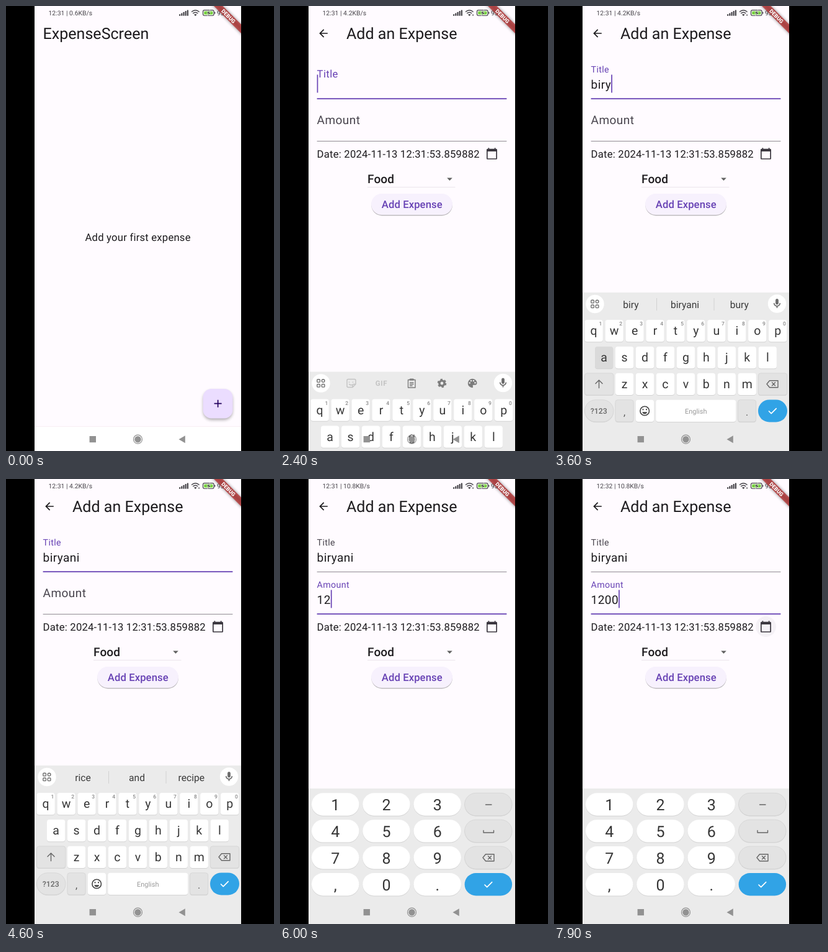
These frames come from a looping animation (432 by 716 pixels, 8000 ms). An HTML page:

```html
<!DOCTYPE html>
<html lang="en">
<head>
<meta charset="utf-8">
<title>Expense form</title>
<style>
html, body { margin: 0; width: 100%; height: 100%; overflow: hidden; background: #000; }
svg { display: block; width: 100vw; height: 100vh; }
text { font-family: Roboto, sans-serif; text-rendering: geometricPrecision; white-space: pre; }
.title { font-size: 25.06px; fill: #1d1b1e; }
.body { font-size: 16.66px; letter-spacing: .2125px; fill: #1d1b1e; }
.input { font-size: 19.04px; letter-spacing: .425px; fill: #1d1b1e; }
.status { font-size: 10.4px; fill: #47454a; }
.key { font-size: 19.5px; fill: #363636; text-anchor: middle; }
.hint { font-size: 8.5px; font-weight: 500; fill: #8a8a8a; text-anchor: middle; }
.word { font-size: 15.6px; fill: #3a3a3a; text-anchor: middle; }
.digit { font-size: 25px; fill: #363636; text-anchor: middle; }
.line { fill: none; stroke-width: 1.4; stroke-linecap: round; stroke-linejoin: round; }
</style>
</head>
<body>
<svg id="stage" viewBox="0 0 432 716">
  <defs>
    <clipPath id="phone"><rect x="46" y="0" width="333" height="716"/></clipPath>
    <filter id="soft" x="-30%" y="-30%" width="160%" height="180%"><feGaussianBlur stdDeviation="2.4"/></filter>
    <filter id="faint" x="-10%" y="-20%" width="120%" height="150%"><feGaussianBlur stdDeviation=".7"/></filter>
  </defs>
  <rect width="432" height="716" fill="#000"/>
  <g clip-path="url(#phone)">
    <rect x="46" width="333" height="716" fill="#fffbff"/>

    <g id="home">
      <text class="title" x="59.6" y="53">ExpenseScreen</text>
      <text class="body" x="212.6" y="378" text-anchor="middle">Add your first expense</text>
      <rect x="318" y="619" width="47" height="47" rx="13.6" fill="#000" opacity=".32" filter="url(#soft)"/>
      <rect x="317.6" y="615.9" width="47.8" height="47.6" rx="13.6" fill="#ebddff"/>
      <path d="M335.6 639.7h12M341.6 633.7v12" stroke="#22005d" stroke-width="1.7"/>
    </g>

    <g id="form">
      <path transform="translate(59.8 33.8) scale(.85)" fill="#1d1b1e" d="M20 11H7.83l5.59-5.59L12 4l-8 8 8 8 1.41-1.41L7.83 13H20z"/>
      <text class="title" x="107" y="53">Add an Expense</text>
      <g id="fields"></g>
      <rect id="cursor" width="1.7" height="29" fill="#6742b4"/>
      <text class="body" x="59.6" y="243.5">Date: 2024-11-13 12:31:53.859882</text>
      <circle id="ripple" cx="341.5" cy="237.5" r="16.5" fill="#49454e" opacity=".05"/>
      <path transform="translate(331.3 227.3) scale(.85)" fill="#3c3840" d="M20 3h-1V1h-2v2H7V1H5v2H4c-1.1 0-2 .9-2 2v16c0 1.1.9 2 2 2h16c1.1 0 2-.9 2-2V5c0-1.1-.9-2-2-2zm0 18H4V8h16z"/>
      <text x="141" y="284.5" font-size="19.04" font-weight="500" letter-spacing=".1275" fill="#1d1b1e">Food</text>
      <path d="M269.2 276.6h8.6l-4.3 4.3z" fill="#616161"/>
      <path d="M141 291.5h141.5" stroke="#ebe6ec"/>
      <rect x="147.3" y="303.4" width="130.6" height="34" rx="17" fill="#000" opacity=".25" filter="url(#faint)"/>
      <rect x="147" y="302" width="131" height="34" rx="17" fill="#f7f1fd"/>
      <text x="163.8" y="325" font-size="16.66" font-weight="500" letter-spacing=".085" fill="#6742b4">Add Expense</text>
    </g>

    <rect x="46" y="677" width="333" height="39" fill="#fff"/>
    <path d="M46 676.5h333" stroke="#f8eff4"/>

    <g id="letters">
      <rect x="46" y="461" width="333" height="256" fill="#ebebeb"/>
      <g id="tools" stroke="#7c7c7c" class="line">
        <g stroke="#c3c3c3">
          <path d="M110 473h10q2 0 2 2v6l-5 5h-7q-2 0-2-2v-9q0-2 2-2zM122 481h-3q-2 0-2 2v3"/>
          <path d="M111.500 477.500v.5M117.500 477.500v.5M111.500 481q2 2 4.500 1"/>
        </g>
        <text x="163.400" y="483.300" font-size="11.500" font-weight="700" text-anchor="middle" fill="#c3c3c3" stroke="none" letter-spacing=".6">GIF</text>
        <path d="M206.500 474h11.500v12.500h-11.500zM209.500 478.500h5.500M209.500 481h5.500M209.500 483.500h3.500"/>
        <path d="M210 473.500h4.500" stroke-width="3"/>
        <circle cx="261" cy="479.500" r="4.100" stroke-width="3.400"/>
        <circle cx="261" cy="479.500" r="6.200" stroke-width="2.200" stroke-dasharray="3.3 3.193" stroke-linecap="butt"/>
        <path d="M310 472.300a7.200 7.200 0 1 0 0 14.400q1.700-.5 1-2.200-1-2 1-2.300h2.500q3-.3 3-3.500a7.200 7.200 0 0 0-7.500-6.400z" fill="#7c7c7c" stroke="none"/>
        <g fill="#ebebeb" stroke="none">
          <circle cx="305.700" cy="479" r="1.300"/><circle cx="308" cy="475.500" r="1.300"/>
          <circle cx="312" cy="475.500" r="1.300"/><circle cx="314.500" cy="478.800" r="1.300"/>
        </g>
      </g>
      <g id="words"><path d="M165.500 470v20M258 470v20" stroke="#d2d2d2"/></g>
      <circle cx="66" cy="479.500" r="14.700" fill="#fff"/>
      <circle cx="359.500" cy="479" r="14.700" fill="#fff"/>
      <g class="line" stroke="#707070">
        <rect x="59.800" y="473.300" width="4.600" height="4.600" rx="1.200"/><rect x="67.300" y="473.300" width="4.600" height="4.600" rx="2.300"/>
        <rect x="59.800" y="481" width="4.600" height="4.600" rx="1.200"/><rect x="67.300" y="481" width="4.600" height="4.600" rx="1.200"/>
      </g>
      <path transform="translate(349.900 469.300) scale(.8)" fill="#6c6c6c" d="M12 14c1.660 0 3-1.340 3-3V5c0-1.660-1.340-3-3-3S9 3.340 9 5v6c0 1.660 1.340 3 3 3zm5-3c0 2.760-2.240 5-5 5s-5-2.240-5-5H5c0 3.530 2.610 6.430 6 6.920V21h2v-3.080c3.390-.49 6-3.390 6-6.920z"/>
      <g id="keys"></g>
      <g class="line" stroke="#666">
        <path d="M72.500 614.500v-12M67 607.500l5.500-5.500 5.500 5.500"/>
        <g id="erase"><path d="M347.500 602.800h13.500v11h-13.500l-4.500-5.500zM351.500 605.800l5 5M356.500 605.800l-5 5"/></g>
        <circle cx="146.200" cy="651.500" r="7.300" stroke="#444" stroke-width="1.600"/>
        <path d="M143.500 649v.6M149 649v.6" stroke="#444" stroke-width="2"/>
        <path d="M142.200 653.200h8q-1 3.300-4 3.300t-4-3.300z" fill="#444" stroke="none"/>
        <path d="M346.500 652l3.700 3.700 8-8" stroke="#fff" stroke-width="1.700"/>
      </g>
    </g>

    <g id="numbers">
      <rect x="46" y="498" width="333" height="219" fill="#ebebeb"/>
      <g id="pads"></g>
      <g class="line" stroke="#666">
        <path d="M331.500 524h9.500"/>
        <path d="M328 565.500v3.500h16.500v-3.500"/>
        <path d="M331.500 603.800h13.500v11h-13.500l-4.500-5.500zM335.500 606.800l5 5M340.500 606.800l-5 5"/>
        <path d="M330 653l3.700 3.700 8-8" stroke="#fff" stroke-width="1.700"/>
      </g>
    </g>

    <g fill="#929292">
      <rect x="134.600" y="692" width="10.400" height="10.200"/>
      <circle cx="212.500" cy="697.200" r="5.200"/>
      <circle cx="212.500" cy="697.200" r="7" fill="none" stroke="#929292" stroke-width="1.200"/>
      <path d="M278.500 697.200l10.300-6v12z"/>
    </g>

    <text id="clock" class="status" x="68.500" y="15"></text>
    <g id="signal" fill="#47454a"></g>
    <g fill="none" stroke="#47454a" stroke-width="1.400">
      <path d="M299 9.500q6.300-5.500 12.600 0M301.200 12q4.100-3.500 8.200 0"/>
      <path d="M303 13.800q2.300-1.800 4.600 0l-2.300 2.400z" fill="#47454a" stroke="none"/>
      <path id="traffic" d="M309.800 13.700h2.600l-1.300 2.500z" fill="#47454a" stroke="none"/>
      <rect x="317.500" y="6.700" width="17.600" height="8.800" rx="2.400" stroke-width="1.200"/>
    </g>
    <rect x="319.200" y="8.400" width="14.200" height="5.400" rx="1" fill="#74d13c"/>
    <rect x="335.900" y="9.600" width="1.400" height="3" rx=".6" fill="#47454a"/>
    <path d="M328.500 6.500l-5.300 5.200h3.200l-1.400 4 5.300-5.300h-3.200z" fill="#333" stroke="#fffbff" stroke-width=".6"/>
    <text class="status" x="340" y="15">95</text>
    <path d="M331-4h14.500L383 33.700v14.300z" fill="#000" opacity=".45" filter="url(#soft)"/>
    <path d="M335 0h14.400L379 29.600V44z" fill="#b71c1c" fill-opacity=".66"/>
    <text transform="translate(358.600 16.400) rotate(45)" y="3.100" font-size="8.670" font-weight="900" text-anchor="middle" fill="#fff">DEBUG</text>
  </g>
</svg>
<script>
const LOOP = 8000, LEFT = 59.6, PRIMARY = '#6742b4', MUTED = '#49454e';
const $ = id => document.getElementById(id);

function add(parent, tag, attrs, text) {
  const el = document.createElementNS('http://www.w3.org/2000/svg', tag);
  for (const k in attrs) el.setAttribute(k, attrs[k]);
  if (text !== undefined) el.textContent = text;
  parent.appendChild(el);
  return el;
}
const set = (el, attrs) => { for (const k in attrs) el.setAttribute(k, attrs[k]); };
const show = (el, on) => { el.style.display = on ? '' : 'none'; };

// Latest value whose start time has passed
const at = (t, track) => track.reduce((v, [start, next]) => t >= start ? next : v, track[0][1]);

const FILL = { white: '#fff', grey: '#e3e3e3', blue: '#31a3e6' };
const keys = {};

function key(parent, name, x, y, w, h, r, kind) {
  if (kind !== 'blue') add(parent, 'rect', { x, y: y + 1, width: w, height: h, rx: r, fill: '#d3d3d3' });
  const face = add(parent, 'rect', { x, y, width: w, height: h, rx: r, fill: FILL[kind] });
  if (kind === 'grey') set(face, { stroke: '#d4d4d4', 'stroke-width': .8 });
  keys[name] = face;
}

function buildLetters() {
  const g = $('keys'), pitch = 32.95, w = 29.3, h = 35.3;
  [['qwertyuiop', 49.5, 505], ['asdfghjkl', 66, 548], ['zxcvbnm', 98.9, 590.8]].forEach(([row, x0, y], r) => {
    [...row].forEach((c, i) => {
      const x = x0 + i * pitch;
      key(g, c, x, y, w, h, 4, 'white');
      add(g, 'text', { class: 'key', x: x + w / 2, y: y + 24.2 }, c);
      if (r === 0) add(g, 'text', { class: 'hint', x: x + 25.3, y: y + 9.2 }, (i + 1) % 10);
    });
  });
  key(g, 'shift', 49.5, 590.8, 46.5, h, 4, 'grey');
  key(g, 'erase', 329.3, 590.8, 46.5, h, 4, 'grey');
  const y = 633.7;
  key(g, 'mode', 49.5, y, 46.5, h, 17.6, 'grey');
  key(g, 'comma', 98.9, y, w, h, 4, 'grey');
  key(g, 'smile', 131.8, y, w, h, 4, 'white');
  key(g, 'space', 164.2, y, 129, h, 4, 'white');
  key(g, 'stop', 296.4, y, w, h, 4, 'grey');
  key(g, 'enter', 329, y - .3, 47, 36, 18, 'blue');
  const label = (x, base, size, fill, s, weight = 400) =>
    add(g, 'text', { x, y: base, 'font-size': size, 'font-weight': weight, fill, 'text-anchor': 'middle' }, s);
  label(72.3, 656, 12.3, '#666', '?123', 500);
  label(113.6, 659, 16, '#555', ',');
  label(311, 659, 16, '#555', '.');
  label(228.7, 655.6, 11, '#9a9a9a', 'English');
}

function buildNumbers() {
  const g = $('pads');
  ['123-', '456_', '789<', ',0.>'].forEach((row, r) => [...row].forEach((c, i) => {
    const x = 51 + i * 82.2, y = 505.3 + r * 42.9;
    key(g, c, x, y, 76.5, 36.4, 18.2, i < 3 ? 'white' : r < 3 ? 'grey' : 'blue');
    if (i < 3) add(g, 'text', { class: 'digit', x: x + 38.3, y: y + 27.7 }, c);
  }));
}

function buildField(name, top) {
  const g = $('fields');
  return {
    top,
    label: add(g, 'text', { class: 'input' }, name),
    value: add(g, 'text', { class: 'input', x: LEFT, y: top + 133 }, ''),
    line: add(g, 'rect', { x: LEFT, width: 305.8 })
  };
}

buildLetters();
buildNumbers();
for (let i = 0; i < 5; i++)
  add($('signal'), 'rect', { x: 279 + i * 3.2, y: 13.2 - i * 1.7, width: 2.2, height: 2.6 + i * 1.7, rx: .5 });
const words = [124, 211, 298.8].map(x => add($('words'), 'text', { class: 'word', x, y: 486 }));
const title = buildField('Title', 0), amount = buildField('Amount', 68);

const TITLE = [[0, ''], [3200, 'bi'], [3400, 'bir'], [3600, 'biry'], [3800, 'birya'], [4000, 'biryani']];
const AMOUNT = [[0, ''], [5700, '1'], [6000, '12'], [6200, '120'], [6700, '1200']];
const PRESSED = [[0, ''], [3200, 'r'], [3400, 'y'], [3600, 'a'], [3800, ''], [6200, '0'], [6700, '']];
const CURSOR = [[0, false], [2400, true], [4400, false], [5100, true], [5500, false], [5700, true], [6900, false], [7300, true]];
const WORDS = [[0, ''], [3200, 'bi big bit'], [3400, 'bir bird birthday'], [3600, 'biry biryani bury'],
  [3800, 'birya biryani biryanis'], [4000, 'rice and recipe']];
const SPEED = [[0, '0.6'], [2000, '4.2'], [6000, '10.8']];

// lift: 0 = label resting in the field, 1 = floating above it
function drawField(f, text, lift, focused) {
  const scale = 1 - .25 * lift, y = f.top + 122 - 15 * lift;
  set(f.label, { transform: `translate(${LEFT} ${y}) scale(${scale})` });
  f.label.style.fill = focused ? PRIMARY : MUTED;
  f.value.textContent = text;
  set(f.line, focused
    ? { y: f.top + 148.3, height: 1.8, fill: PRIMARY }
    : { y: f.top + 149, height: .85, fill: '#7c787f' });
}

let pressed = '';
function press(name) {
  if (name === pressed) return;
  if (pressed) set(keys[pressed], { fill: FILL.white });
  if (name) set(keys[name], { fill: '#dadada' });
  pressed = name;
}

function draw(t) {
  const onForm = t >= 1700, onAmount = t >= 5100;
  const step = Math.floor(t / 100) * 100;
  const p = Math.min(1, Math.max(0, (step - 2300) / 200));
  const rise = p * p * (3 - 2 * p);

  show($('home'), !onForm);
  show($('form'), onForm);
  drawField(title, at(t, TITLE), rise, rise > 0 && !onAmount);
  drawField(amount, at(t, AMOUNT), onAmount ? 1 : 0, onAmount);

  const active = onAmount ? amount : title;
  show($('cursor'), at(t, CURSOR));
  const width = onForm && active.value.textContent ? active.value.getComputedTextLength() : 0;
  set($('cursor'), { x: LEFT + width, y: active.top + 110.5 });

  show($('letters'), rise > 0 && !onAmount);
  set($('letters'), { transform: `translate(0 ${255 * (1 - rise)})` });
  show($('numbers'), onAmount);
  press(at(t, PRESSED));

  const line = at(t, WORDS);
  show($('tools'), !line);
  show($('words'), line);
  line.split(' ').forEach((w, i) => { words[i].textContent = w; });

  show($('ripple'), t >= 7900);
  show($('traffic'), t >= 700);
  $('clock').textContent = `12:${t < 7500 ? 31 : 32} | ${at(t, SPEED)}KB/s`;
}

const begin = performance.now();
function tick() {
  draw((performance.now() - begin) % LOOP);
  requestAnimationFrame(tick);
}
tick();
</script>
</body>
</html>
```
